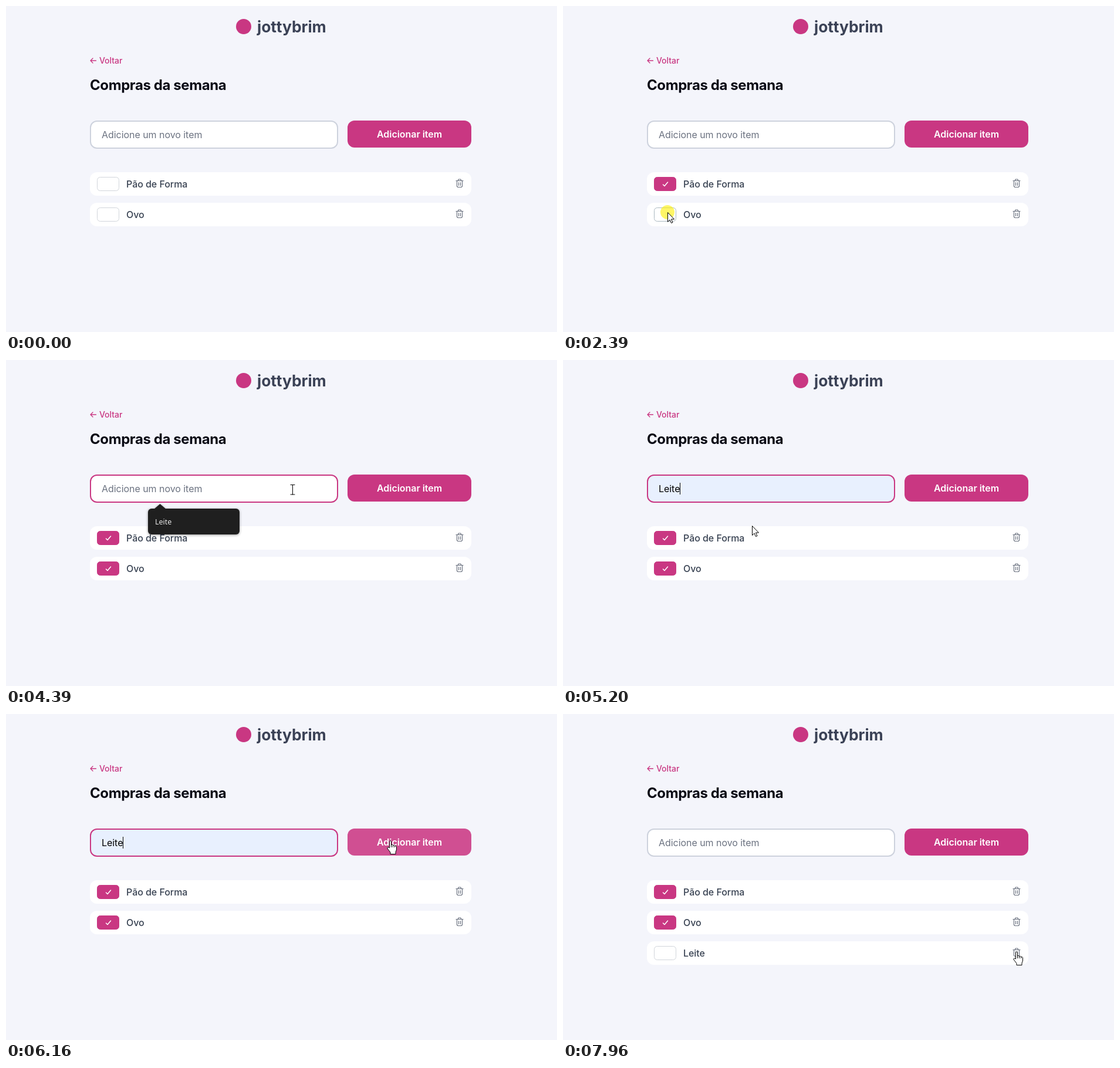
These frames come from a looping animation (939 px wide and 555 px high, 8000 ms). An HTML page:

```html
<!DOCTYPE html>
<html lang="pt-BR">
<head>
<meta charset="utf-8">
<title>Lista de compras</title>
<style>
  html, body { margin: 0; width: 100%; height: 100%; overflow: hidden; background: #f4f5fb; }
  svg { display: block; width: 939px; height: 555px; font: 500 16px Inter, sans-serif; letter-spacing: -.003em; fill: #374151; }
  .pink { fill: #c93782; }
  .white { fill: #fff; }
  .regular { font-weight: 400; }
  .line { fill: none; stroke-linecap: round; stroke-linejoin: round; }
  .box { fill: #fff; stroke: #d1d5db; }
  .box.hover { stroke: #aab8c0; }
  .box.checked { fill: #c93782; stroke: #c93782; }
  h1, #title { font-size: 24px; font-weight: 700; letter-spacing: -.017em; fill: #080914; }
  #field { fill: #fff; stroke: #cdd2dd; stroke-width: 2; }
  #field.active { stroke: #c93782; }
  #field.filled { fill: #e8f0fe; }
  #button.hover { fill: #d04f92; }
  #menu { filter: drop-shadow(0 1px 2px #0006); }
  #menu text { font: 500 12.5px 'Noto Sans', sans-serif; fill: #e8e8e8; }
  .pointer { fill: #fff; stroke: #000; stroke-linejoin: round; }
</style>
</head>
<body>
<svg viewBox="0 0 939 555">
  <defs>
    <g id="trash" class="line" stroke="#6b7280" stroke-width="1.2">
      <path d="M.5 3.5H12.5M4 3.5V2L5 1H8L9 2V3.5M2 4V13L3.5 14.5H9.5L11 13V4M5 6.5V11.5M8 6.5V11.5"/>
    </g>
  </defs>

  <circle class="pink" cx="405" cy="35" r="13"/>
  <text x="428" y="44.5" font-size="26.5" font-weight="700" fill="#3b4256">jottybrim</text>

  <path class="line" stroke="#c93782" stroke-width="1.3" d="M153.5 93H144M148 89L144 93L148 97"/>
  <text class="pink" x="159" y="98" font-size="14">Voltar</text>
  <text id="title" x="143" y="143">Compras da semana</text>

  <rect id="field" x="144" y="196" width="421" height="46" rx="11"/>
  <text id="hint" class="regular" x="163" y="225" fill="#6b7280">Adicione um novo item</text>
  <text id="value" class="regular" x="163" y="225" fill="#000">Leite</text>
  <rect id="caret" y="209" width="1" height="20" fill="#000"/>

  <rect id="button" class="pink" x="582" y="195" width="211" height="46" rx="12"/>
  <text class="white" x="687.5" y="224" font-weight="600" text-anchor="middle">Adicionar item</text>

  <g id="rows"></g>

  <g id="menu">
    <path d="M252 254L262.5 245L273 254" fill="#1f1f1f"/>
    <rect x="242" y="253" width="156" height="44" rx="6" fill="#1f1f1f"/>
    <rect id="option" x="242" y="260" width="156" height="30" fill="#3a3a3a"/>
    <text x="254" y="280">Leite</text>
  </g>

  <g id="cursor">
    <circle id="press" r="12" fill="#fff000" fill-opacity=".6"/>
    <path id="arrow" class="pointer" d="M.5.5V16.5L4 13L6.5 18.5L9 17.5L6.5 12H11.5Z"/>
    <path id="beam" class="line" stroke="#000" d="M-3 -8.5H4M.5 -8.5V8M-3 8H4"/>
    <path id="hand" class="pointer" d="M-1.5 13V2Q0 -1 1.5 2V8Q3 6 4.5 8.5Q6 7 7.5 9.5Q9 8 10.5 11V16L9 20V23.5H0V20.5L-5 14Q-5 10 -1.5 13M1.5 8V12M4.5 8.5V12M7.5 9.5V12"/>
  </g>
</svg>

<script>
const LOOP = 8000, PRESS = 80, BLINK = 500, ROW_STEP = 52;
const CLICK = { bread: 1530, egg: 2390, field: 3870, option: 5110, add: 6290 };
const FOCUSED = CLICK.field + 20;
const PICKED = CLICK.option + PRESS / 2;
const ADDED = CLICK.add + PRESS;

const ENTRY = { x: 805, y: 552 };
const MOVES = [
  { from: 180, to: 800, x: 126, y: 255 },
  { from: 820, to: 1320, x: 181, y: 303 },
  { from: 1750, to: 2190, x: 178, y: 351 },
  { from: 2490, to: 3190, x: 574, y: 214 },
  { from: 3300, to: 3820, x: 488, y: 221 },
  { from: 4640, to: 5000, x: 322, y: 282 },
  { from: 5210, to: 5500, x: 582, y: 204 },
  { from: 5500, to: 5900, x: 655, y: 215 },
  { from: 6760, to: 7550, x: 795, y: 358 },
  { from: 7550, to: 7960, x: 773, y: 404 }
];

const $ = id => document.getElementById(id);
const show = (el, on) => el.style.display = on ? '' : 'none';
const within = (v, from, to) => v >= from && v < to;
const inside = (p, x, y, w, h) => within(p.x, x, x + w) && within(p.y, y, y + h);
const easeOut = u => Math.sin(u * Math.PI / 2);

const rows = ['Pão de Forma', 'Ovo', 'Leite'].map((name, i) => {
  const row = document.createElementNS('http://www.w3.org/2000/svg', 'g');
  row.setAttribute('transform', `translate(143 ${283 + ROW_STEP * i})`);
  row.innerHTML = `
    <rect class="white" width="650" height="40" rx="12"/>
    <rect class="box" x="12.5" y="8.5" width="37" height="23" rx="5"/>
    <path class="tick line" stroke="#fff" stroke-width="1.5" d="M27.5 21L30 23.5L35.5 17"/>
    <text x="62" y="26">${name}</text>
    <use href="#trash" x="623.5" y="11"/>`;
  $('rows').append(row);
  return {
    row, box: row.querySelector('.box'), tick: row.querySelector('.tick'),
    checkedAt: [CLICK.bread, CLICK.egg][i] + PRESS
  };
});

function cursorAt(t) {
  let { x, y } = ENTRY;
  for (const move of MOVES) {
    if (t < move.from) break;
    const u = easeOut(Math.min(1, (t - move.from) / (move.to - move.from)));
    x += (move.x - x) * u;
    y += (move.y - y) * u;
  }
  return { x: Math.round(x), y: Math.round(y) };
}

function render(t) {
  const p = cursorAt(t);
  const menuOpen = within(t, FOCUSED, PICKED);
  const onOption = menuOpen && inside(p, 242, 253, 156, 44);
  const onField = inside(p, 143, 195, 423, 48);
  const onButton = inside(p, 583, 195, 210, 46);
  const onTrash = t >= ADDED && inside(p, 764, 396, 18, 20);
  const focused = within(t, FOCUSED, ADDED);
  const picked = within(t, PICKED, ADDED);
  const filled = picked || onOption;
  const blinkOn = Math.floor((t - (picked ? PICKED : FOCUSED)) / BLINK) % 2 === 0;

  $('field').classList.toggle('active', onField || focused);
  $('field').classList.toggle('filled', filled);
  show($('hint'), !filled);
  show($('value'), filled);
  show($('caret'), focused && blinkOn && (picked || !onOption));
  $('caret').setAttribute('x', picked ? 199 : 163);
  $('button').classList.toggle('hover', onButton);
  show($('menu'), menuOpen);
  show($('option'), onOption);

  rows.forEach(({ row, box, tick, checkedAt }, i) => {
    const checked = t >= checkedAt;
    box.classList.toggle('checked', checked);
    box.classList.toggle('hover', inside(p, 155, 291 + ROW_STEP * i, 38, 24));
    show(tick, checked);
    show(row, i < 2 || t >= ADDED);
  });

  const kind = onButton || onTrash ? 'hand' : onField ? 'beam' : 'arrow';
  for (const name of ['arrow', 'beam', 'hand']) show($(name), name === kind);
  show($('press'), Object.values(CLICK).some(at => within(t, at, at + PRESS)));
  show($('cursor'), t >= MOVES[0].from);
  $('cursor').setAttribute('transform', `translate(${p.x} ${p.y})`);
}

const start = performance.now();
function tick(now) {
  render(Math.max(0, now - start) % LOOP);
  requestAnimationFrame(tick);
}
render(0);
requestAnimationFrame(tick);
</script>
</body>
</html>
```
